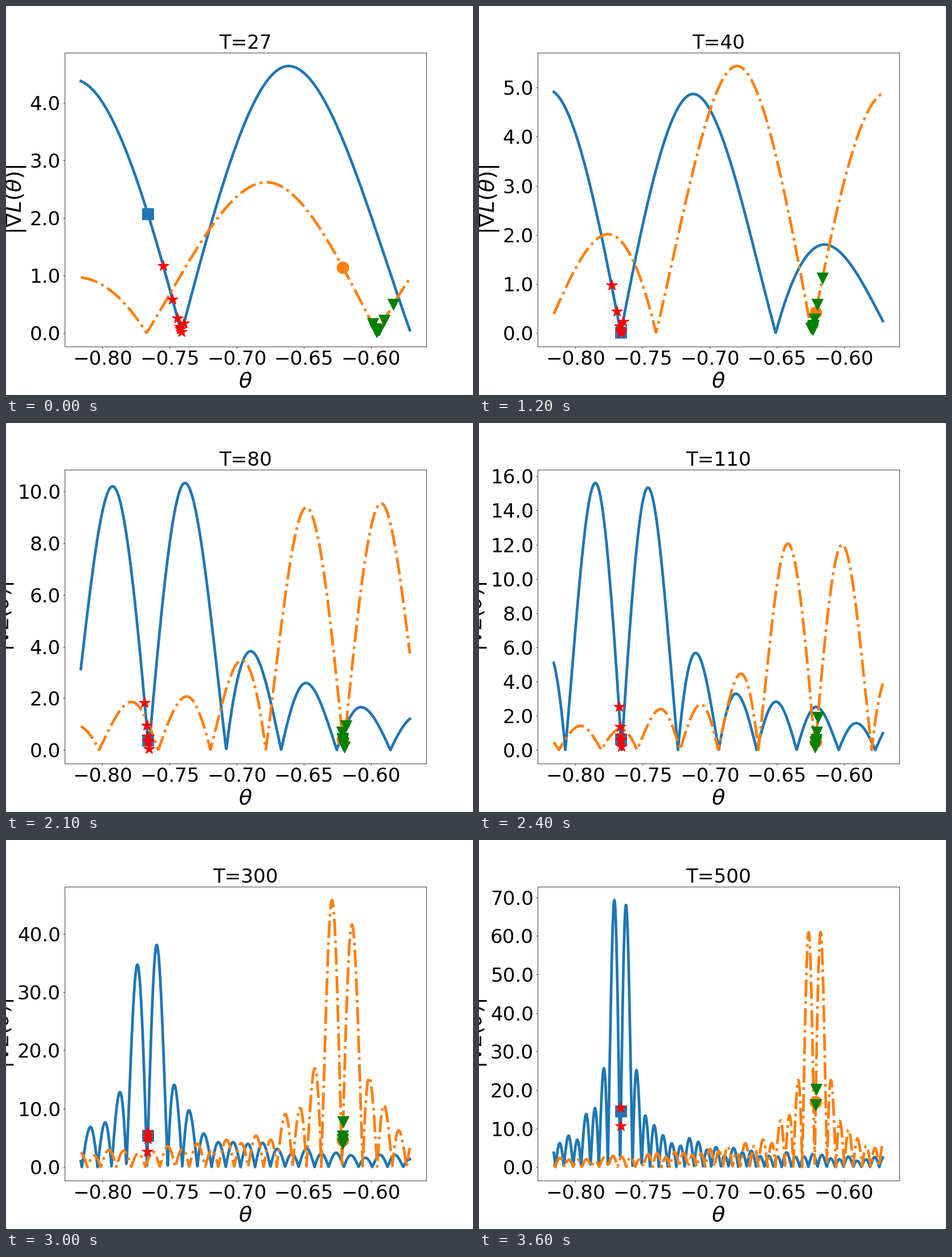
A matplotlib script that plays this animation: 820 by 683 pixels, repeating every 3.9 s.

```python
import numpy as np
import matplotlib.pyplot as plt
from matplotlib.animation import FuncAnimation
from matplotlib.ticker import FormatStrFormatter, MaxNLocator

W, H, DPI = 820, 683, 64
K = W / 12 / DPI            # point sizes below are for a 12 inch wide page
LO, HI = -0.81616, -0.57111
X0, X1 = 131.4, 709.1       # stage x of LO and HI
STEPS = (27, 30, 33, 36, 40, 45, 55, 80, 110, 200, 300, 400, 500)

# Per step: stage x of the main zero, heights of the lobes left and right of it.
KEY_STEPS = (27, 33, 40, 55, 110, 300, 500)
BLUE = [(308, 4.4, 4.64), (258.5, 3.6, 3.52), (249, 4.95, 4.87), (251, 5.7, 6.16),
        (250.5, 15.6, 15.33), (247.7, 34.7, 38.1), (247.9, 69.3, 68)]
ORANGE = [(652, 2.62, 2), (595, 4.04, 3.3), (584.4, 5.44, 4.9), (595.5, 7.16, 7.5),
          (590, 12.05, 12), (590, 45.8, 41.6), (589.3, 61, 61)]


def lobe_offsets(T, width):
    """Distances of the lobe peaks from the main zero."""
    n = np.arange(int(600 * T / 7750) + 4)
    return np.where(n == 0, width, 14300 + 7750 * (n - 1)) / T


def lobe_heights(main, count, rng):
    """Main lobe, then side lobes that decay and grow more uneven."""
    n = np.arange(1, count)
    jitter = 1 + 0.35 * (1 - 1 / n) * rng.uniform(-1, 1, count - 1)
    return np.append(main, 0.37 * main * n ** -0.75 * jitter)


class Wave:
    """Noisy derivative of a sinc as a smooth chain of peaks and zeros."""

    def __init__(self, T, keys, width):
        self.zero, left, right = (np.interp(T, KEY_STEPS, k) for k in zip(*keys))
        rng = np.random.default_rng(4)
        off = lobe_offsets(T, width)
        m = len(off)
        h = np.concatenate([lobe_heights(left, m, rng)[::-1],
                            lobe_heights(right, m, rng)])
        p = self.zero + np.concatenate([-off[::-1], off])
        # The higher neighbour takes the wider share of each gap.
        z = p[:-1] + np.diff(p) * (0.5 - 0.28 * np.diff(h) / (h[:-1] + h[1:]))
        z[m - 1] = self.zero
        sign = (-1.0) ** np.arange(2 * m)
        self.x, self.y, self.slope = np.zeros((3, 4 * m - 1))
        self.x[::2], self.x[1::2] = p, z
        self.y[::2] = sign * h
        self.slope[1::2] = sign[1:] * np.pi / 4 * (
            h[:-1] / (z - p[:-1]) + h[1:] / (p[1:] - z))

    def __call__(self, x):
        i = np.clip(np.searchsorted(self.x, x) - 1, 0, len(self.x) - 2)
        d = self.x[i + 1] - self.x[i]
        t = (x - self.x[i]) / d
        ease = t * t * (3 - 2 * t)
        y = (self.y[i] * (1 - ease) + self.y[i + 1] * ease
             + d * self.slope[i] * t * (1 - t) ** 2
             + d * self.slope[i + 1] * t * t * (t - 1))
        return np.abs(y)


def estimates(T, zero, true_x, side):
    """Points that crowd around the zero, closer as T grows."""
    spread = 30 * (27 / T) ** 1.5
    centre = zero + np.clip(true_x - zero, -2, 2)
    return centre + side * spread * np.linspace(-0.6, 1, 8 - T // 80) ** 3


def theta(x):
    return LO + (x - X0) / (X1 - X0) * (HI - LO)


plt.rcParams.update({name: size * K for name, size in {
    "axes.linewidth": 0.8, "axes.titlepad": 6, "axes.labelpad": 4,
    "xtick.major.size": 3.5, "xtick.major.width": 0.8, "xtick.major.pad": 3.5,
    "ytick.major.size": 3.5, "ytick.major.width": 0.8, "ytick.major.pad": 3.5,
    "xtick.labelsize": 36, "ytick.labelsize": 36, "axes.titlesize": 36,
    "axes.labelsize": 40, "lines.linewidth": 5, "lines.markersize": 22,
    "lines.markeredgewidth": 1,
}.items()})

fig, ax = plt.subplots(figsize=(W / DPI, H / DPI), dpi=DPI)
fig.subplots_adjust(left=0.125, right=0.9, bottom=0.125, top=0.88)
pad = 0.05 * (HI - LO)
ax.set_xlim(LO - pad, HI + pad)
ticks = np.linspace(-0.8, -0.6, 5)
ax.set_xticks(ticks, [f"\u2212{-t:.2f}" for t in ticks])
ax.yaxis.set_major_locator(MaxNLocator(9, steps=[1, 2, 2.5, 5, 10]))
ax.yaxis.set_major_formatter(FormatStrFormatter("%.1f"))
ax.set_xlabel(r"$\theta$")
ax.set_ylabel(r"$|\nabla L(\theta)|$")
title = ax.set_title("")

xs = np.linspace(X0, X1, 1000)


class Series:
    """One curve with its true value and the estimates on it."""

    def __init__(self, keys, width, true_x, side, color):
        self.waves = [Wave(T, keys, width) for T in STEPS]
        self.true_x, self.side = true_x, side
        self.line, = ax.plot([], [], "-" if side < 0 else "-.", color=color)
        self.mark, = ax.plot([], [], "s" if side < 0 else "o", color=color, zorder=3)
        self.dots, = ax.plot([], [], "*" if side < 0 else "v", zorder=4,
                             color="red" if side < 0 else "green")

    def update(self, i):
        wave = self.waves[i]
        spots = estimates(STEPS[i], wave.zero, self.true_x, self.side)
        for artist, x in ((self.line, xs), (self.dots, spots),
                          (self.mark, np.array([self.true_x]))):
            artist.set_data(theta(x), wave(x))
        return self.line.get_ydata().max()


series = (Series(BLUE, 5080, 249.3, -1, "tab:blue"),
          Series(ORANGE, 5250, 591.2, 1, "tab:orange"))


def draw(i):
    top = max(s.update(i) for s in series)
    ax.set_ylim(-0.05 * top, 1.05 * top)
    title.set_text(f"T={STEPS[i]}")
    return ax.lines


anim = FuncAnimation(fig, draw, frames=len(STEPS), interval=300,
                     repeat=True, repeat_delay=0, blit=False)
plt.show()
```
